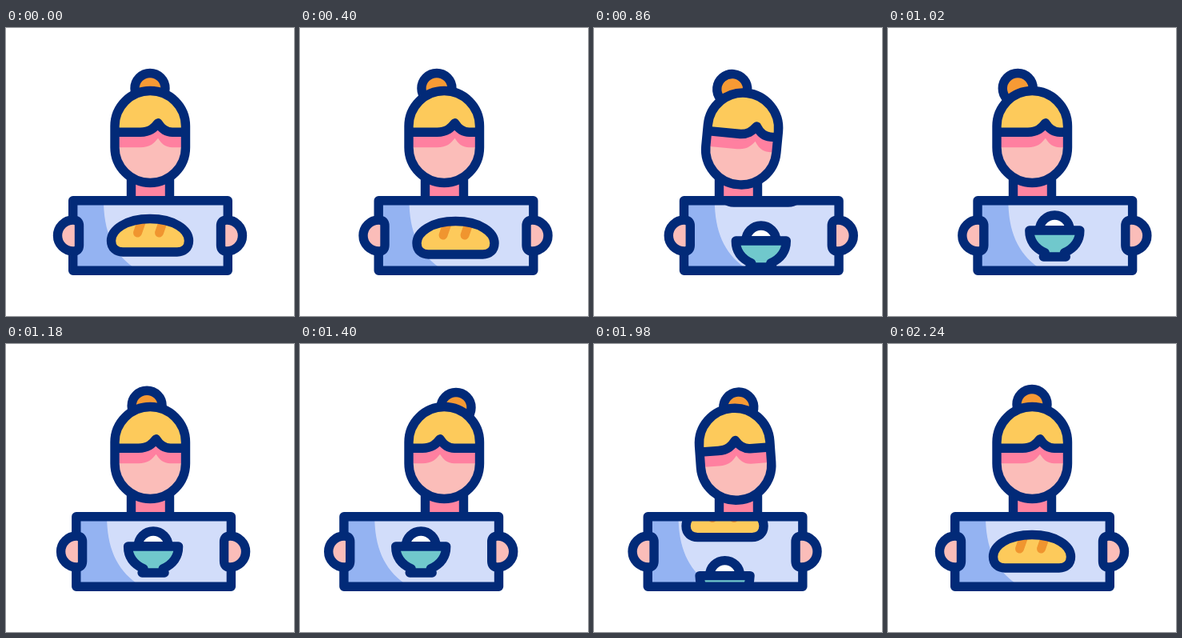
Write an HTML page that moves like this. It is 360 by 360 pixels and loops after 2400 ms.

```html
<!DOCTYPE html>
<html lang="en">
<head>
<meta charset="utf-8">
<title>Food sign</title>
<style>
  html, body { margin: 0; width: 100%; height: 100%; overflow: hidden; background: #fff; }
  svg { display: block; width: 100vw; height: 100vh; }
  .line { stroke: #022a78; stroke-width: 11.4; stroke-linecap: round; stroke-linejoin: round; }
</style>
</head>
<body>
<svg viewBox="0 0 360 360" fill="none">
  <defs>
    <rect id="skull" x="136" y="78.5" width="88.5" height="115" rx="44.2"/>
    <path id="fringe" d="M60 230V131H168C180 131 185 126 190 119.5C194 126 199 131 208 131H300V230Z"/>
    <path id="loaf" d="M131.5 266C131.5 252 150 238.5 180 238.5C210 238.5 228.5 252 228.5 266C228.5 275 222 280 214 280H146C138 280 131.5 275 131.5 266Z"/>
    <path id="hand" d="M84 240A19.5 19.5 0 0 0 84 279Q91.5 279 91.5 271.5V247.5Q91.5 240 84 240Z"/>
    <clipPath id="inHead"><use href="#skull"/></clipPath>
    <clipPath id="inBoard"><rect x="83.5" y="215.5" width="194" height="88"/></clipPath>
  </defs>

  <path class="line" fill="#ff84a0" d="M156.5 180V216H204.5V180"/>

  <g id="head">
    <circle id="bun" class="line" cx="180" cy="75.5" r="19" fill="#f79a34"/>
    <use href="#skull" fill="#fdca5b"/>
    <g clip-path="url(#inHead)">
      <g id="parting">
        <use href="#fringe" fill="#ff80a0"/>
        <use href="#fringe" y="19" fill="#fbbdb9"/>
        <use href="#fringe" class="line"/>
      </g>
    </g>
    <use href="#skull" class="line"/>
  </g>

  <g id="board">
    <g clip-path="url(#inBoard)">
      <path fill="#d2ddfa" d="M83 215H278V304H83Z"/>
      <path fill="#94b3f2" d="M83 215H122C122 254 134 281 159 299V304H83Z"/>
      <g id="dishes">
        <use href="#loaf" fill="#fdca5b"/>
        <path stroke="#f0952f" stroke-width="11" stroke-linecap="round" d="M169 243L164.5 256M196 243L191.5 256"/>
        <use href="#loaf" class="line"/>
        <g class="line" transform="translate(0 75)">
          <path fill="#fff" d="M161 253A19 19 0 0 1 199 253Z"/>
          <path fill="#70c8cc" d="M148.5 253H211.5C211.5 268 203 276 192 281L194 286H166L168 281C157 276 148.5 268 148.5 253Z"/>
        </g>
      </g>
    </g>
    <rect class="line" x="83.7" y="215.7" width="193.6" height="87.6"/>
    <g class="line" fill="#fbbdb9">
      <use href="#hand"/>
      <use href="#hand" transform="matrix(-1 0 0 1 360 0)"/>
    </g>
  </g>
</svg>
<script>
  const LOOP = 2400, SPACING = 75, WINDUP = 6;
  const $ = id => document.getElementById(id);

  // Eased progress from 0 to 1 between two times
  const ease = (t, from, to) => {
    const p = Math.min(1, Math.max(0, (t - from) / (to - from)));
    return p * p * (3 - 2 * p);
  };
  const move = (id, x, y = 0) => $(id).setAttribute('transform', `translate(${x} ${y})`);

  function draw(now) {
    const t = now % LOOP;
    const right = ease(t, 200, 600), left = ease(t, 1000, 1400), back = ease(t, 1800, 2200);
    // Sway from rest to the right pose, to the left pose and back to rest
    const sway = (r, l) => r * right + (l - r) * left - l * back;

    move('board', sway(28.8, -28.8));
    move('parting', sway(7, -15), -0.7);
    move('bun', sway(-18, 15), sway(0, 4));

    // The head dips a little as it tilts
    const tilt = 8.6 * (ease(t, 600, 800) - ease(t, 800, 950)
      - ease(t, 1400, 1800) + ease(t, 1800, 2150));
    $('head').setAttribute('transform',
      `translate(0 ${0.4 * Math.abs(tilt)}) rotate(${tilt} 180 187)`);

    // Each swap winds up the other way, then slides the dishes along
    const windup = ease(t, 200, 600) - ease(t, 1400, 1800);
    const slide = ease(t, 600, 950) - ease(t, 1800, 2150);
    move('dishes', 0, WINDUP * windup - (SPACING + WINDUP) * slide);
    requestAnimationFrame(() => draw(performance.now()));
  }
  draw(performance.now());
</script>
</body>
</html>
```
